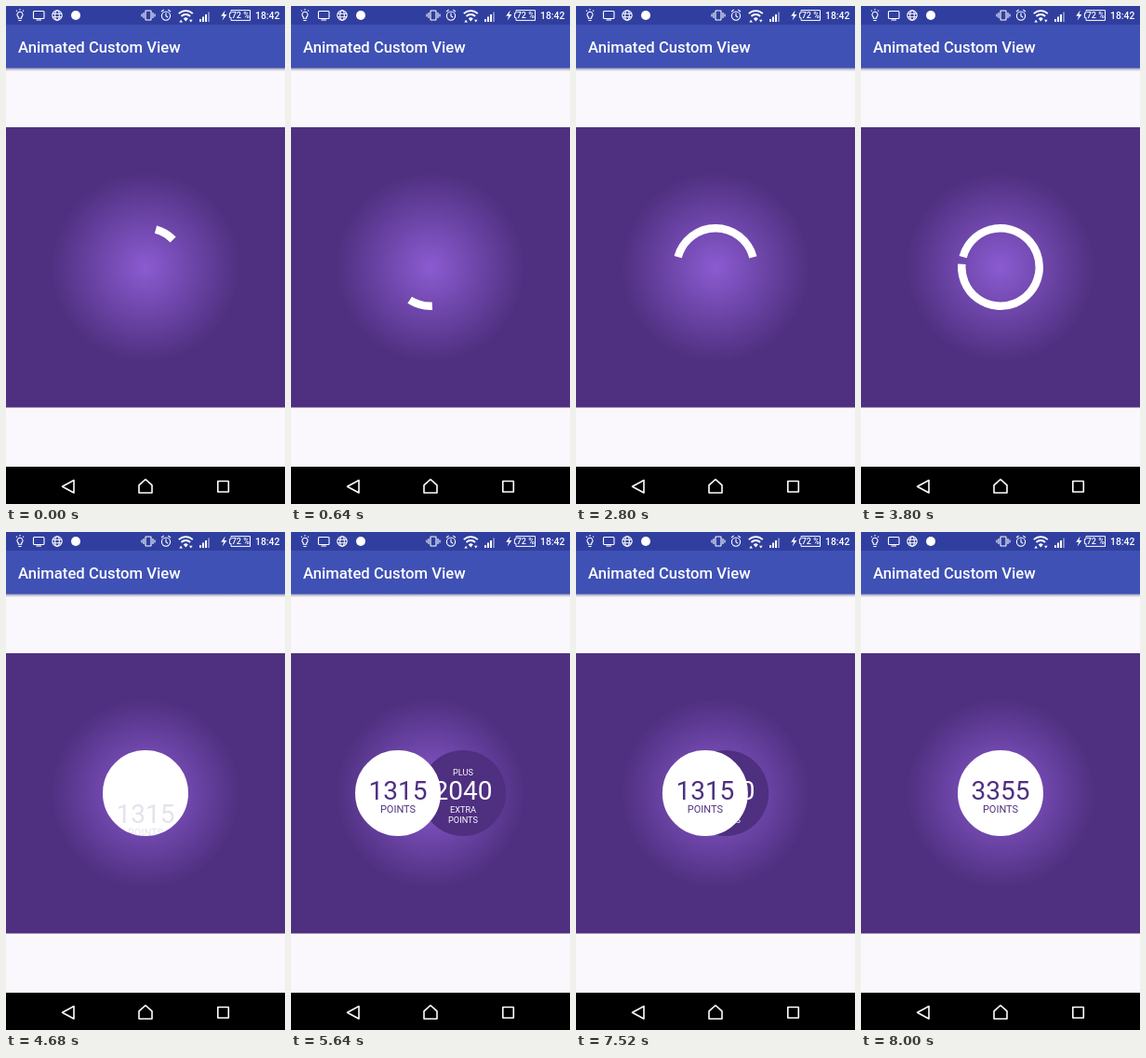
Animation, 300 px wide and 534 px high, one loop 8040 ms. Source, as an HTML page:

```html
<!DOCTYPE html>
<html lang="en">
<head>
<meta charset="utf-8">
<title>Animated Custom View</title>
<style>
html, body { margin: 0; width: 100%; height: 100%; overflow: hidden; background: #faf8fc; }
svg { display: block; width: 100%; height: 100%; font-family: Roboto, sans-serif; }
.mid { text-anchor: middle; }
.num { font-size: 28px; }
.label { font-size: 11px; }
.small { font-size: 9.2px; }
.line { fill: none; stroke: #fff; }
</style>
</head>
<body>
<svg viewBox="0 0 300 534">
  <defs>
    <radialGradient id="glow" gradientUnits="userSpaceOnUse" cx="150" cy="280" r="101">
      <stop offset="0" stop-color="#8b5bd1"/>
      <stop offset="1" stop-color="#4f3080"/>
    </radialGradient>
    <linearGradient id="shade" x2="0" y2="1">
      <stop offset="0" stop-color="#8d91ad"/>
      <stop offset="1" stop-color="#faf8fc"/>
    </linearGradient>
    <clipPath id="disc"><circle cx="150" cy="280" r="46"/></clipPath>
  </defs>

  <rect width="300" height="534" fill="#faf8fc"/>
  <rect y="66" width="300" height="4" fill="url(#shade)"/>
  <rect width="300" height="66.5" fill="#3f51b5"/>
  <rect width="300" height="20" fill="#303f9f"/>
  <text x="13" y="50" font-size="16.7" font-weight="500" fill="#fff">Animated Custom View</text>

  <g id="status" fill="#fff">
    <g class="line" stroke-width="1.1">
      <path d="M13.3 13.2v-1.5a3 3 0 1 1 3.4 0v1.5zM13.4 15.5h3.2M15 3v1.4M10.9 4.6l1 1M19.1 4.6l-1 1"/>
      <rect x="29.5" y="5.5" width="11.5" height="8" rx="1"/>
      <path d="M32.5 15h5.5"/>
      <circle cx="55" cy="10" r="5.2"/>
      <ellipse cx="55" cy="10" rx="2.3" ry="5.2"/>
      <path d="M50 8.2h10M50 11.8h10"/>
      <rect x="150" y="5" width="6" height="10" rx=".6"/>
      <path d="M148 7v6M158 7v6M146 8.5v3M160 8.5v3"/>
      <circle cx="172" cy="10.6" r="4.6"/>
      <path d="M172 7.6v3.2l2.2 1.4M167 6.2l2.6-2.2M177 6.2l-2.6-2.2"/>
    </g>
    <circle cx="75" cy="10" r="5"/>
    <g class="line" stroke-width="1.8">
      <path d="M185.8 8.2a10.5 10.5 0 0 1 15 0M188.5 11a6.8 6.8 0 0 1 9.6 0"/>
    </g>
    <path d="M190.8 13.4a3.6 3.6 0 0 1 5 0l-2.5 3.2zM186.3 17.4l1.8-2.6 1.8 2.6zM197 14.8h3.6l-1.8 2.6z"/>
    <path d="M208 14h2v3h-2zM211 11.5h2v5.5h-2zM214 9h2v8h-2z"/>
    <path d="M217 6.5h2V17h-2z" opacity=".4"/>
    <path d="M235.8 4.5l-4.6 6.2h2.9l-1.5 4.8 4.9-6.4h-3z"/>
    <path class="line" d="M242 4.6h20.5v10.8H242v-3h-1.6V7.6h1.6z" stroke-width="1"/>
    <text class="mid" x="252.3" y="13.3" font-size="9" font-weight="500">72 %</text>
    <text x="268" y="13.8" font-size="10.4" font-weight="500">18:42</text>
  </g>

  <rect y="130" width="300" height="300.5" fill="#4f3080"/>
  <circle cx="150" cy="280" r="101" fill="url(#glow)"/>

  <path id="arc" class="line" stroke-width="8.5"/>

  <g id="extra" class="mid" fill="#fff">
    <circle cx="150" cy="280" r="46" fill="#4e2f80"/>
    <text class="small" x="150" y="260.5">PLUS</text>
    <text class="num" x="150" y="287">2040</text>
    <text class="small" x="150" y="301.3">EXTRA</text>
    <text class="small" x="150" y="311.5">POINTS</text>
  </g>

  <g id="main" class="mid" fill="#4f3080">
    <circle id="ring" cx="150" cy="280" class="line"/>
    <g clip-path="url(#disc)">
      <g id="score">
        <text id="total" class="num" x="150" y="287">1315</text>
        <text class="label" x="150" y="300.8">POINTS</text>
      </g>
    </g>
  </g>

  <rect y="494" width="300" height="40" fill="#000"/>
  <g class="line" stroke-width="1.6" stroke-linejoin="round">
    <path d="M73 508.5v13.5l-12.5-6.7z"/>
    <path d="M143 522v-8.2l7-6.3 7 6.3v8.2z"/>
    <rect x="227.8" y="509.5" width="11.5" height="11.5"/>
  </g>
</svg>

<script>
const LOOP = 8040, CX = 150, CY = 280, R = 46, STROKE = 8.5, SPREAD = 40.5;
const FIRST = 1315, SUM = 3355;

// [time in ms, tail, head] in degrees clockwise from the top
const SPIN = [
  [0, 15, 45], [900, 243, 280], [1440, 357, 363], [1680, 398, 455],
  [2520, 567, 708], [2800, 645, 795], [3360, 645, 876], [3840, 645, 1005]
];

const $ = id => document.getElementById(id);
const [arc, extra, main, ring, score, total] =
  ["arc", "extra", "main", "ring", "score", "total"].map($);

const part = (t, a, b) => Math.min(1, Math.max(0, (t - a) / (b - a)));
const ease = (t, a, b) => (1 - Math.cos(Math.PI * part(t, a, b))) / 2;
const show = (el, on) => el.setAttribute("visibility", on ? "visible" : "hidden");
const shift = (el, x, y) => el.setAttribute("transform", `translate(${x} ${y})`);

function spinAt(t) {
  let i = 0;
  while (i < SPIN.length - 2 && t >= SPIN[i + 1][0]) i++;
  const a = SPIN[i], b = SPIN[i + 1], p = part(t, a[0], b[0]);
  return [1, 2].map(k => a[k] + (b[k] - a[k]) * p);
}

function arcPath(tail, head) {
  const r = R - STROKE / 2;
  const point = deg => {
    const a = deg * Math.PI / 180;
    return `${CX + r * Math.sin(a)} ${CY - r * Math.cos(a)}`;
  };
  return `M${point(tail)}A${r} ${r} 0 ${head - tail > 180 ? 1 : 0} 1 ${point(head)}`;
}

function draw(t) {
  const closed = t >= 3840;
  show(arc, !closed);
  show(main, closed);
  if (!closed) arc.setAttribute("d", arcPath(...spinAt(t)));

  // the ring thickens inwards until it is a disc
  const width = STROKE + (R - STROKE) * ease(t, 3840, 4440);
  ring.setAttribute("r", R - width / 2);
  ring.setAttribute("stroke-width", width);

  const rise = ease(t, 4500, 5240);
  score.setAttribute("opacity", rise);
  shift(score, 0, 29 * (1 - rise));

  const gap = SPREAD * (ease(t, 5250, 5765) - ease(t, 7190, 7700));
  show(extra, gap > 0);
  shift(main, -gap, 0);
  shift(extra, gap, 0);

  total.textContent = Math.round(FIRST + (SUM - FIRST) * part(t, 7600, 7990));
}

const start = performance.now();
function tick() {
  draw((performance.now() - start) % LOOP);
  requestAnimationFrame(tick);
}
tick();
</script>
</body>
</html>
```
